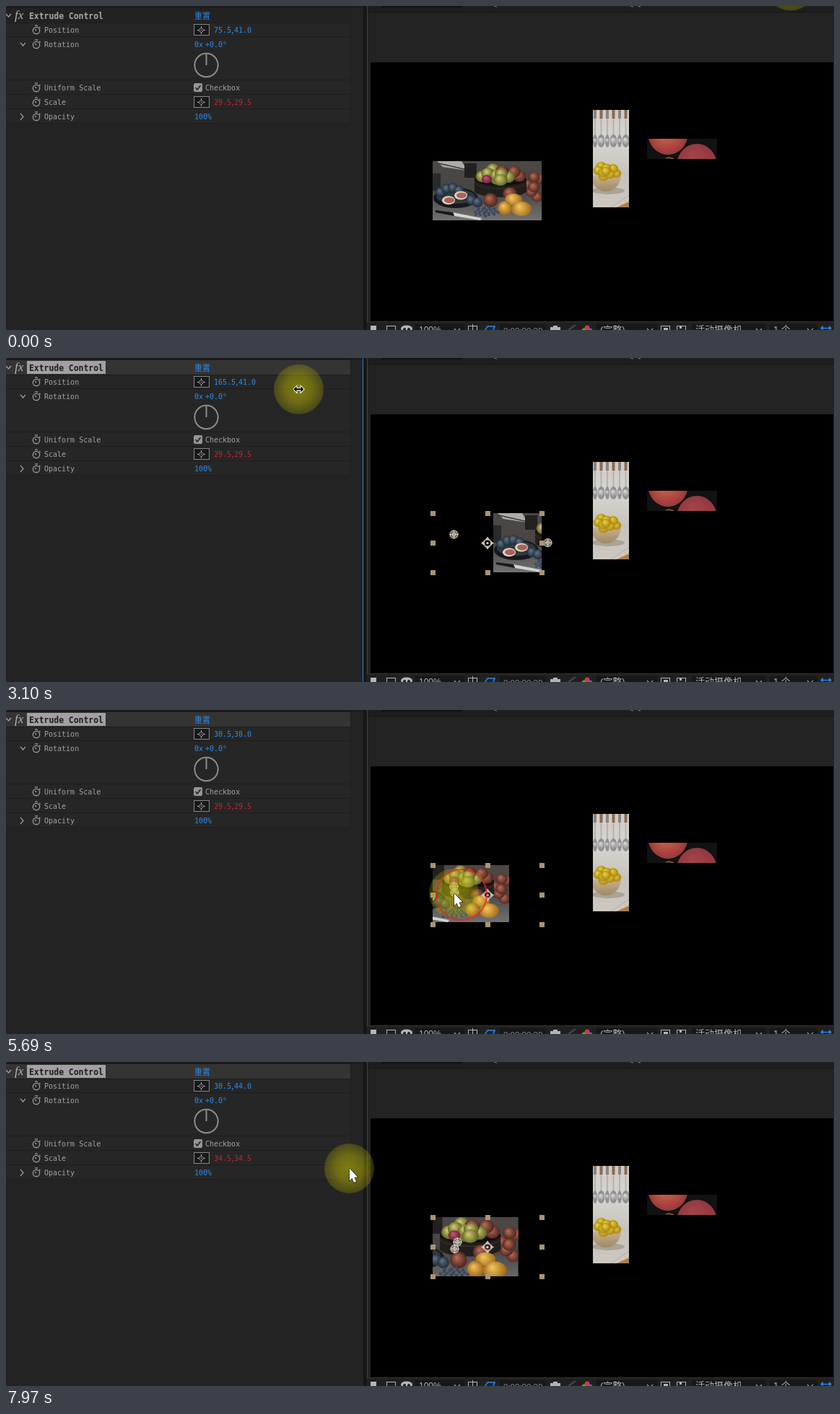
An HTML page with a canvas for the animation above (8 s loop, 1147x449 px).

```html
<!DOCTYPE html>
<html>
<head>
<meta charset="utf-8">
<style>
html, body { margin: 0; width: 100%; height: 100%; overflow: hidden; background: #232323; }
canvas { display: block; }
</style>
</head>
<body>
<canvas id="stage" width="1147" height="449"></canvas>
<script>
const c = document.getElementById('stage').getContext('2d');
const MONO = '"DejaVu Sans Mono", "Noto Sans CJK SC", "Noto Sans CJK", monospace';
const SANS = '"Liberation Sans", "Noto Sans CJK SC", "Noto Sans CJK", sans-serif';
const BLUE = '#2d8ceb', RED = '#c4262c', GREY = '#a2a2a2', INK = '#b4b4b4';
const LOOP = 8000, STEP = 70;
const LAYER = { x: 591, y: 215, w: 151, h: 82 };

// Eased motion through key points: time followed by values
function glide(t, ...keys) {
  const i = keys.findIndex(k => k[0] > t);
  if (i < 1) return (i ? keys[keys.length - 1] : keys[0]).slice(1);
  const a = keys[i - 1], b = keys[i];
  const f = (1 - Math.cos(Math.PI * (t - a[0]) / (b[0] - a[0]))) / 2;
  return a.slice(1).map((v, j) => v + (b[j + 1] - v) * f);
}
const half = v => Math.floor(v) + 0.5;

function position(t) {
  const [x, y] = t < 4990
    ? glide(t, [2470, 75.5, 41], [3170, 168, 41], [3700, -32, 41], [4030, 40.5, 41])
    : glide(t, [4990, 40.5, 41], [5200, 75.5, 35], [5690, 30.5, 38], [5760, 30.5, 44]);
  return [half(x), Math.round(y)];
}
const scaleAt = t => half(glide(t, [6130, 29.5], [6480, 56.5], [7110, 3.5], [7460, 50.5], [7740, 34.5])[0]);

// The pointer travels freely, or follows the value it drags
function cursor(t) {
  if (t < 1630) return glide(t, [0, 1087, -28], [640, 228, 322], [700, 200, 600]);
  if (t < 2540) return glide(t, [1630, 202, 440], [2400, 300.5, 32.5]);
  const [px, py] = position(t), s = scaleAt(t);
  if (t < 4120) return [240 + px, Math.min(50, 34 + (t - 2540) / 60)];
  if (t < 4990) return glide(t, [4120, 281, 51], [4540, 634, 294], [4680, 641.5, 252.5], [4920, 631, 256]);
  if (t < 5830) return [LAYER.x + px - 1, LAYER.y + py + 1];
  if (t < 7740) return [594 + s, 232 + s / 2];
  return glide(t, [7830, 627, 231], [7970, 475.5, 147.5]);
}

// The picture is held for one step, counted from the start of each burst
const bursts = [7900, 6130, 4990, 4120, 1630, 0];
const hold = t => t - (t - bursts.find(b => b <= t)) % STEP;

function box(x, y, w, h, fill) { c.fillStyle = fill; c.fillRect(x, y, w, h); }
function frame(x, y, w, h, color) { c.lineWidth = 1; c.strokeStyle = color; c.strokeRect(x, y, w, h); }
function text(s, x, y, color, font = '10px ' + MONO) {
  c.font = font; c.fillStyle = color; c.fillText(s, x, y);
}
function trace(p) {
  c.beginPath();
  for (let i = 0; i < p.length; i += 2) c.lineTo(p[i], p[i + 1]);
}
function line(color, width, ...p) {
  c.strokeStyle = color; c.lineWidth = width;
  trace(p); c.stroke();
}
function poly(fill, ...p) {
  c.fillStyle = fill;
  trace(p); c.fill();
}
function oval(x, y, rx, ry, fill) {
  c.beginPath(); c.ellipse(x, y, rx, ry, 0, 0, 7); c.fillStyle = fill; c.fill();
}
function ring(x, y, r, color, width = 1) {
  c.beginPath(); c.arc(x, y, r, 0, 7); c.strokeStyle = color; c.lineWidth = width; c.stroke();
}
function ball(x, y, rx, ry, light, dark) {
  const g = c.createRadialGradient(x - rx / 4, y - ry / 3, 0, x, y, rx * 1.1);
  g.addColorStop(0, light);
  g.addColorStop(1, dark);
  oval(x, y, rx, ry, g);
}
// Round things spread in a sunflower pattern, outermost drawn first
function pile(n, x, y, w, h, r, ...tones) {
  for (let i = n - 1; i >= 0; i--) {
    const d = Math.sqrt(i / n), a = i * 2.4;
    ball(x + w * d * Math.cos(a), y + h * d * Math.sin(a), r, r * 0.9, ...tones[i % tones.length]);
  }
}
function fade(y0, y1, ...colors) {
  const g = c.createLinearGradient(0, y0, 0, y1);
  colors.forEach((col, i) => g.addColorStop(i / (colors.length - 1), col));
  return g;
}
function clipped(x, y, w, h, draw) {
  c.save();
  c.beginPath(); c.rect(x, y, w, h); c.clip();
  draw();
  c.restore();
}

function fruitTable() {
  const pear = ['#d6cd72', '#4f561c'], apple = ['#b87058', '#451c1a'], plum = ['#61758a', '#1b2531'];
  const pink = ['#c45a76', '#5e1830'], mango = ['#f3c95c', '#9a5f16'];
  box(0, 0, 151, 82, fade(0, 82, '#4d4844', '#474544', '#727070'));
  poly('#aeaca8', 6, 0, 40, 0, 48, 13, 14, 8);
  line('#3d3a37', 1.5, 8, 3, 48, 12);
  box(44, 3, 17, 20, '#222120');
  box(0, 17, 11, 24, '#282a2c');
  pile(6, 140, 36, 11, 24, 8, apple);
  oval(32, 51, 31, 14, '#16191c');
  oval(32, 49, 27, 10, '#33383c');
  for (let i = 0; i < 7; i++) ball(11 + i * 8.5, 43 - 8 * Math.sin(i * 0.8) + i, 7, 7, ...plum);
  for (const x of [22, 39]) {
    oval(x, 63 - x * 0.4, 9, 6, '#e0d4c3');
    oval(x + 1, 63 - x * 0.4, 7, 4, '#ad6159');
  }
  box(58, 25, 72, 17, '#211e1b');
  oval(94, 41, 36, 9, '#211e1b');
  oval(94, 25, 36, 9, '#100e0d');
  pile(10, 95, 18, 30, 9, 9, pear, pear, apple);
  ball(75, 25, 7, 6, ...pink);
  ball(94, 26, 10, 8, ...pear);
  c.beginPath(); c.ellipse(94, 29, 36, 9, 0, 0, Math.PI);
  c.strokeStyle = '#3a342e'; c.lineWidth = 1; c.stroke();
  ball(80, 54, 10, 10, ...apple);
  ball(107, 45, 10, 9, ...apple);
  ball(112, 53, 12, 8, ...mango);
  ball(100, 65, 10, 10, ...mango);
  ball(123, 66, 14, 10, ...mango);
  pile(24, 74, 70, 18, 7, 1.8, ['#4a6286', '#1d2b47']);
  poly('#d2d3d3', 28, 71, 68, 79, 66, 82, 30, 76);
  poly('#18191b', 4, 68, 28, 71, 30, 76, 4, 71);
}

function kitchen() {
  const lemon = ['#ecd23c', '#a07c0c'];
  box(813, 144, 50, 135, fade(144, 279, '#cfccc6', '#d6d4cf', '#c6c2bb', '#cbc8c2'));
  for (let i = 0; i < 6; i++) {
    const x = 816 + i * 8.5;
    box(x - 2, 144, 4, 12, i % 2 ? '#8b6a4c' : '#8a837b');
    line('#aaaaa8', 1.5, x, 156, x, 182);
    ball(x, 187, i % 2 ? 5 : 3, 9, '#dededc', '#8f908f');
  }
  oval(834, 256, 23, 5, '#aca397');
  c.beginPath(); c.ellipse(831, 235, 21, 22, 0, 0, Math.PI);
  c.fillStyle = fade(235, 257, '#c6b28f', '#a08868'); c.fill();
  pile(9, 831, 229, 16, 9, 7, lemon);
  line('#b0aca5', 1, 838, 279, 863, 262);
  poly('#a97e4e', 846, 279, 863, 271, 863, 279);
}

function redDiscs() {
  box(888, 184, 97, 28, '#121212');
  ball(917, 179, 27, 27, '#e2704a', '#94353a');
  ball(957, 218, 27, 27, '#a4454a', '#90383d');
  line('#c87a4c', 1.2, 914, 211, 919, 210, 925, 212);
}

function stopwatch(x, y) {
  ring(x, y + 1, 4.7, GREY, 1.2);
  line(GREY, 1.2, x - 2, y - 6, x + 2, y - 6);
  line(GREY, 1.2, x - 2, y - 1, x, y + 1);
  line(GREY, 1.2, x + 4, y - 4, x + 5.5, y - 2.5);
}
function pointButton(y) {
  box(260, y - 8, 22, 16, '#191919');
  frame(260.5, y - 7.5, 21, 15, '#858585');
  ring(270.5, y + 0.5, 2.8, '#999');
  box(270, y, 1, 1, '#ccc');
  for (const d of [-5, 4]) {
    box(270 + d, y, 2, 1, '#bbb');
    box(270, y + d, 1, 2, '#bbb');
  }
}
function pair(a, b, y, color, first = color) {
  const w = a.length * 6;
  text(a, 288, y, first);
  text(',', 287 + w, y + 1, color);
  text(b, 292 + w, y, color);
}

function effectPanel(t, pos, scale) {
  const selected = t >= 2540;
  box(0, 0, 478, 163, '#262626');
  box(0, 0, 495, 2, '#1b1b1b');
  box(0, 3, 478, 20, selected ? '#343434' : '#222');
  for (const y of [2, 23, 42, 102, 122, 142, 162]) box(0, y, 478, 1, '#1d1d1d');
  box(477, 3, 1, 160, '#1f1f1f');
  box(495, 0, 5, 449, '#161616');
  if (selected && t < 4990) box(494, 0, 1, 449, '#2d7fd8');

  line(GREY, 1.2, 0, 11, 3.5, 15, 7, 11);
  line(GREY, 1.2, 20, 51, 23.5, 55, 27, 51);
  line(GREY, 1.2, 20, 149, 24, 153.5, 20, 158);
  text('fx', 12, 18, '#b5b5b5', 'italic 17px "Liberation Serif", serif');
  if (selected) box(29, 4, 109, 18, '#a39fa3');
  text('Extrude Control', 32, 18, selected ? '#1c1c1c' : '#a8a8a8', 'bold 11.4px ' + MONO);
  text('重置', 261, 18, BLUE, '11px ' + SANS);

  const rows = { Position: 33, Rotation: 53, 'Uniform Scale': 113, Scale: 133, Opacity: 153 };
  for (const name in rows) {
    stopwatch(42, rows[name]);
    text(name, 53, rows[name] + 3.5, GREY);
  }
  pointButton(33);
  pointButton(133);
  const s = scale.toFixed(1);
  pair(pos[0].toFixed(1), pos[1].toFixed(1), 37, BLUE, t >= 2400 && !selected ? '#fff' : BLUE);
  pair(s, s, 137, RED);
  text('0x', 261, 57, BLUE);
  text('+0.0°', 276, 57, BLUE);
  text('100%', 261, 157, BLUE);
  ring(277.5, 82, 16.2, '#8c8c8c', 2);
  line('#8c8c8c', 2, 277.5, 82, 277.5, 67);
  c.beginPath(); c.roundRect(260, 107, 12, 12, 2); c.fillStyle = '#959595'; c.fill();
  line('#222', 1.6, 262.5, 113, 265, 116, 269.5, 110);
  text('Checkbox', 276, 116.5, GREY);
}

function menu(label, x, w, size = 13) {
  box(x, 441, w, 8, '#171717');
  text(label, x + 5, 453, INK, size + 'px ' + SANS);
  const end = x + w - 10;
  line(GREY, 1.2, end - 4, 447, end, 451, end + 4, 447);
}

function viewerBar() {
  box(499, 438, 648, 11, '#202020');
  box(499, 437, 648, 1, '#343434');
  menu('100%', 567, 68, 12);
  menu('(完整)', 818, 84);
  menu('活动摄像机', 950, 103);
  menu('1 个', 1058, 66);
  box(684, 441, 64, 8, '#171717');
  text('0:00:00:00', 689, 454, '#8b8b8b', '11.5px ' + SANS);
  box(505, 443, 8, 6, INK);
  for (const x of [527.5, 640.5, 907.5, 929.5]) frame(x, 443.5, 12, 9, INK);
  oval(555, 447, 8, 4.5, INK);
  oval(552, 448, 2, 2, '#222');
  oval(558, 448, 2, 2, '#222');
  line(INK, 1, 646.5, 441, 646.5, 449);
  line(BLUE, 1.5, 663, 450, 667, 444, 677, 444, 675, 450);
  box(754, 445, 14, 4, INK);
  box(758, 443, 6, 2, INK);
  line('#4a4a4a', 2, 779, 449, 789, 442);
  oval(805, 446, 3.5, 3.5, '#d63a32');
  oval(801, 450, 3.5, 3.5, '#3caf4a');
  oval(809, 450, 3.5, 3.5, '#3670dd');
  box(911, 446, 6, 3, INK);
  box(933, 444, 3, 3, INK);
  line(BLUE, 1.3, 1129, 446.5, 1143, 446.5);
  poly(BLUE, 1128, 446.5, 1132, 443, 1132, 449);
  poly(BLUE, 1144, 446.5, 1140, 443, 1140, 449);
}

function effectPoint(x, y) {
  const ink = '#d2c8ba';
  oval(x, y, 6, 6, 'rgba(200,190,176,.55)');
  ring(x, y, 5.5, ink);
  ring(x, y, 2.5, ink);
  line(ink, 1, x - 6, y, x + 6, y);
  line(ink, 1, x, y - 6, x, y + 6);
}

function selection(pos, scale, points) {
  const { x, y, w, h } = LAYER, mx = x + 76, my = y + 41.5;
  if (points) {
    effectPoint(x + scale, y + scale);
    effectPoint(x + pos[0], y + pos[1]);
  }
  ring(mx, my, 5, '#cbbfb5', 1.8);
  oval(mx, my, 1.6, 1.6, '#e4dcd4');
  for (const [dx, dy] of [[1, 0], [-1, 0], [0, 1], [0, -1]])
    poly('#cbbfb5', mx + dx * 9, my + dy * 9, mx + dx * 5 + dy * 3, my + dy * 5 + dx * 3, mx + dx * 5 - dy * 3, my + dy * 5 - dx * 3);
  for (const i of [0, 0.5, 1]) for (const j of [0, 0.5, 1])
    if (i !== 0.5 || j !== 0.5) box(Math.round(x - 3 + i * w), Math.round(y - 3 + j * h), 7, 7, '#a99475');
}

function viewer(t, pos, scale) {
  const { x, y, w, h } = LAYER;
  box(500, 0, 647, 8, '#1e1e1e');
  box(500, 8, 647, 1, '#151515');
  box(500, 0, 1, 449, '#424242');
  box(520, 0, 112, 2, '#111');
  for (const tx of [676, 865, 875]) line('#777', 1, tx, 0, tx + 4, 1);
  box(505, 78, 641, 360, '#000');
  clipped(813, 144, 50, 135, kitchen);
  clipped(888, 184, 97, 28, redDiscs);
  clipped(x, y, w, h, () => {
    c.translate(x + pos[0], y + pos[1]);
    c.scale(scale / 29.5, scale / 29.5);
    c.translate(-w / 2, -h / 2);
    clipped(0, 0, w, h, fruitTable);
  });
  viewerBar();
  if (t >= 1350) selection(pos, scale, t >= 2540);
}

function pointer(t, x, y) {
  const g = c.createRadialGradient(x, y, 0, x, y, 34.5);
  g.addColorStop(0, 'rgba(205,200,0,.54)');
  g.addColorStop(0.55, 'rgba(195,190,0,.45)');
  g.addColorStop(1, 'rgba(180,175,0,.25)');
  oval(x, y, 34.5, 34.5, g);
  if (t >= 5620 && t < 5900) ring(631, 256, 35 + (t - 5690) * 0.043, 'rgba(225,40,30,.8)', 2);

  c.save();
  c.translate(x, y);
  if (t >= 2400 && t < 2540) {
    poly('#fff', -2, -4, 0, -5, 1.5, -3, 1.5, 1, 7, 3, 7, 10, 5, 14, -2, 14, -6, 8, -6, 5, -4, 5, -2, 8);
    line('#333', 0.8, 2, 2, 2, 6);
    line('#333', 0.8, 4.5, 3, 4.5, 6);
  } else if (t >= 2540 && t < 4050) {
    const shape = [-7, 0, -3, -4, -3, -1, 3, -1, 3, -4, 7, 0, 3, 4, 3, 1, -3, 1, -3, 4, -7, 0];
    line('#fff', 2, ...shape);
    poly('#000', ...shape);
  } else {
    const shape = [0.5, 0, 0.5, 17, 4, 13.5, 6.5, 19.5, 9.5, 18, 7, 12.5, 11.5, 12, 0.5, 0];
    line('#222', 1.5, ...shape);
    poly('#fff', ...shape);
  }
  c.restore();
}

function draw(now) {
  const t = hold(now % LOOP);
  const pos = position(t), scale = scaleAt(t);
  box(0, 0, 1147, 449, '#232323');
  effectPanel(t, pos, scale);
  // The preview trails the value while it is scrubbed in the panel
  viewer(t, t < 4120 ? position(t - STEP) : pos, scale);
  pointer(t, ...cursor(t));
  requestAnimationFrame(draw);
}
requestAnimationFrame(draw);
</script>
</body>
</html>
```
